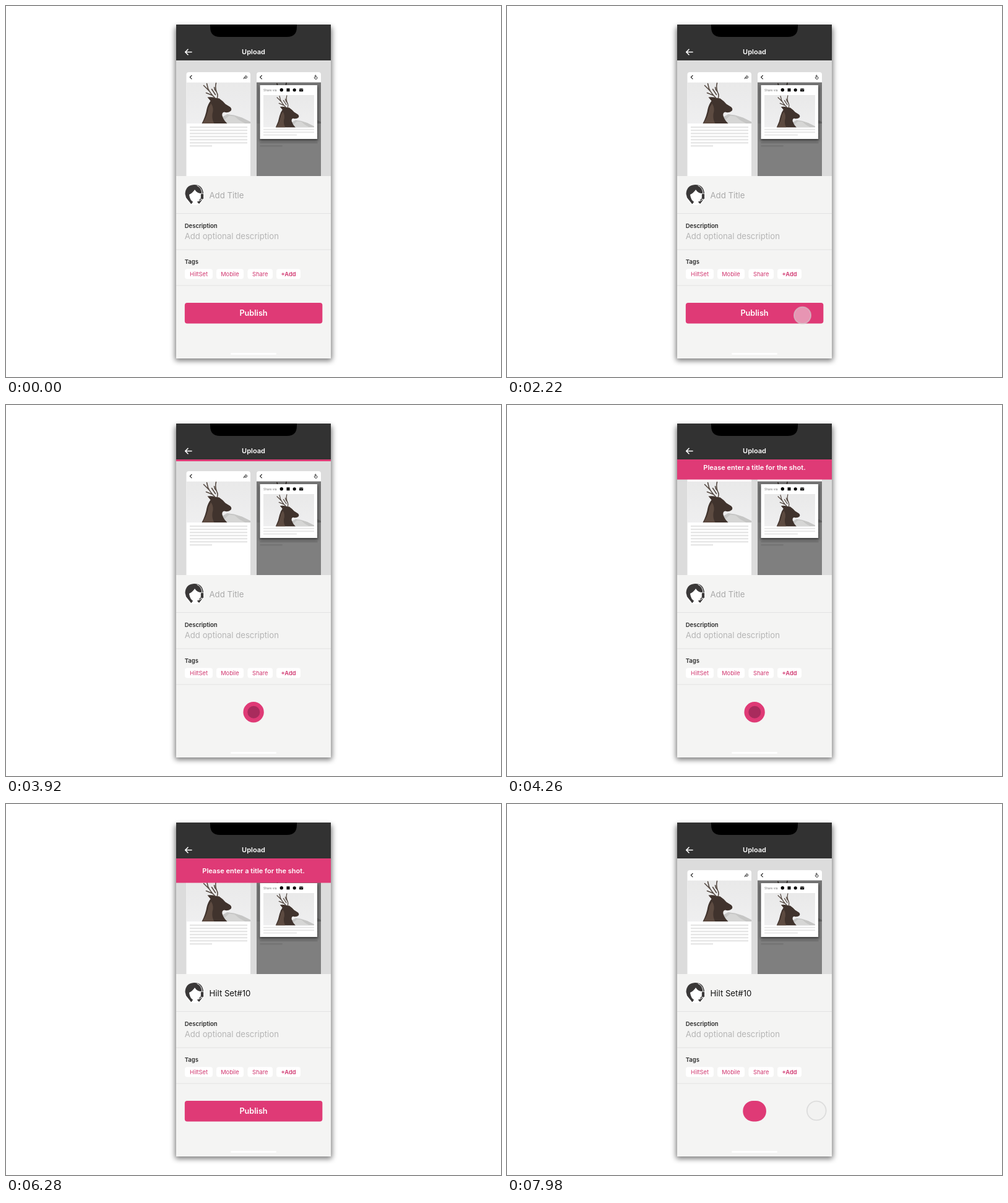
An HTML page for the animation above (8 s loop, 800 by 600 pixels).

```html
<!DOCTYPE html>
<html lang="en">
<head>
<meta charset="utf-8">
<title>Upload form</title>
<style>
  html, body { margin: 0; width: 100%; height: 100%; overflow: hidden; background: #fff; }
  svg { display: block; width: 800px; height: 600px; }
  text { font-family: Inter, "Liberation Sans", sans-serif; }
  .bold { font-weight: 600; }
  .mid { text-anchor: middle; }
  .label { font-size: 9.5px; font-weight: 600; fill: #2b2b2b; }
  .hint { font-size: 13.2px; fill: #b5b5b5; }
  .title { font-size: 13.2px; }
  .tag { font-size: 9.3px; fill: #d0366f; }
  .line { fill: none; stroke-linecap: round; stroke-linejoin: round; }
</style>
</head>
<body>
<svg viewBox="0 0 800 600">
  <defs>
    <filter id="blur" x="-20%" y="-20%" width="140%" height="140%"><feGaussianBlur stdDeviation="4.5"/></filter>
    <filter id="soft" x="-20%" y="-20%" width="140%" height="140%"><feGaussianBlur stdDeviation="2"/></filter>
    <linearGradient id="sky" x2="0" y2="1">
      <stop stop-color="#e9e9e9"/><stop offset="1" stop-color="#efeff0"/>
    </linearGradient>
    <clipPath id="screen"><rect x="275" y="30" width="250" height="540"/></clipPath>
    <clipPath id="photoBox"><rect width="104" height="66.5"/></clipPath>
    <clipPath id="typed"><rect id="typedBox" x="328" y="296" width="0" height="22"/></clipPath>
    <g id="photo" clip-path="url(#photoBox)">
      <rect width="104" height="66.5" fill="url(#sky)"/>
      <path d="M46 66.5L56 57L66 51.500L77 53L90 57L104 64V66.500Z" fill="#c6c6c5"/>
      <path d="M60 62L69 54L78 55L85 61L95 66.500H60Z" fill="#d6d6d5"/>
      <path d="M25 66.500Q31 55 33 43Q35 35 39 30L34 24Q42 23 46 25L53 26Q59 30 63 35L71 40Q74 43 72 46Q68 50 61 48Q57 49 58 54Q60 61 66 66.500Z" fill="#40332d"/>
      <path d="M26 66.500Q34 55 36 41L40 34Q45 42 42 51Q41 60 45 66.500Z" fill="#5d4b41"/>
      <path class="line" d="M46 25Q38 17 35 10L33 2M38 15L28 5M42 21L32 17M50 25Q52 18 46 12L45 8M49 16Q46 9 48 1M47 20L41 11" stroke="#554a43" stroke-width="1.600"/>
    </g>
  </defs>

  <rect x="273" y="34" width="254" height="540" rx="4" fill="#000" opacity=".5" filter="url(#blur)"/>
  <g clip-path="url(#screen)">
    <rect x="275" y="30" width="250" height="540" fill="#f4f4f3"/>
    <rect x="275" y="88" width="250" height="187" fill="#dcdcdc"/>

    <path d="M291.500 275V111a4 4 0 0 1 4-4H391a4 4 0 0 1 4 4V275Z" fill="#fff"/>
    <use href="#photo" x="291.500" y="123.500"/>
    <g id="leftLines" fill="#e6e6e6"></g>

    <path d="M405 275V111a4 4 0 0 1 4-4H505a4 4 0 0 1 4 4V275Z" fill="#fff"/>
    <use href="#photo" x="405" y="123.500"/>
    <rect x="405" y="123.500" width="104" height="151.500" fill="#000" opacity=".5"/>
    <g id="dimLines" fill="#747474"></g>
    <rect x="410" y="130" width="94" height="88" fill="#000" opacity=".45" filter="url(#soft)"/>
    <rect x="410.500" y="128" width="92.500" height="87" fill="#fff"/>
    <text x="416" y="137.700" font-size="4.900" fill="#777">Share via</text>
    <circle cx="445.300" cy="135.800" r="2.700"/>
    <rect x="453.500" y="133.300" width="5" height="5"/>
    <circle cx="466.200" cy="135.800" r="2.600"/>
    <rect x="474" y="133.500" width="6.200" height="4.800" rx=".6"/>
    <path class="line" d="M474.600 134.500L477.100 136.300L479.600 134.500" stroke="#fff" stroke-width=".6"/>
    <use href="#photo" transform="translate(416 144) scale(.788)"/>
    <g id="modalLines" fill="#e6e6e6"></g>

    <g class="line" stroke="#222" stroke-width="1.200">
      <path d="M300 112.500L297.300 115.200L300 117.900M413.300 112.500L410.600 115.200L413.300 117.900"/>
      <path d="M384.300 117.500Q384.700 114 387.500 114V112.500L390 115L387.500 117.300V115.900Q385.800 115.800 384.300 117.500Z" stroke-width=".9"/>
      <path d="M499.500 116V112.300Q500.300 111.300 501 112.300V114.500L503 115.300Q503.300 117 501.800 118.300H500L498 115.800" stroke-width=".9"/>
    </g>

    <g id="banner">
      <rect x="275" y="88" width="250" height="39.500" fill="#df3a76"/>
      <text class="bold mid" x="400" y="111.500" font-size="11" fill="#fff">Please enter a title for the shot.</text>
    </g>

    <rect x="275" y="30" width="250" height="58" fill="#323232"/>
    <path d="M330 30H470V34Q470 50 454 50H346Q330 50 330 34Z"/>
    <path class="line" d="M300 74.500H289.800M294 70.200L289.700 74.500L294 78.800" stroke="#fff" stroke-width="1.600"/>
    <text class="bold mid" x="400" y="77.500" font-size="11" fill="#fff">Upload</text>

    <path d="M275 335.500H525M275 394H525M275 452H525" stroke="#e2e2e2"/>

    <circle cx="305" cy="305.500" r="16" fill="#fff"/>
    <path d="M291 310L289.500 304Q290 290 304 289Q317 289 319 302Q320 309 316 315L312 320H299L295 315Z" fill="#3a3838"/>
    <path d="M296 305Q302 302 305 297Q309 303 315 303Q316 313 308 317.500H303Q297 314 296 305Z" fill="#fff"/>
    <path d="M299 321L302 317H309L313 321Q306 323 299 321Z" fill="#fff"/>
    <path class="line" d="M317 304Q317 294 309 290.500M317 312Q313 317 307 315" stroke="#fff" stroke-width="1"/>
    <rect x="314.500" y="303" width="5" height="10" rx="2.500" fill="#3a3838" stroke="#fff" stroke-width=".8"/>

    <text id="placeholder" class="title" x="328.500" y="310.800" fill="#a9a9a9">Add Title</text>
    <text class="title" x="328.500" y="310.800" fill="#111" clip-path="url(#typed)">Hilt Set#10</text>

    <text class="label" x="288.700" y="359.300">Description</text>
    <text class="hint" x="288.700" y="377.200">Add optional description</text>
    <text class="label" x="288.700" y="417.200">Tags</text>
    <g id="tags"></g>

    <rect x="363" y="561" width="74" height="3" rx="1.500" fill="#fff"/>

    <rect id="button" y="480" height="33.400" fill="#df3a76"/>
    <text id="publish" class="bold mid" x="400" y="501.200" font-size="12.700" fill="#fff">Publish</text>
    <circle id="badge" cx="400.300" cy="496.700" r="10" fill="#a92b5d"/>

    <circle id="touch" fill="#f0f0f0" fill-opacity=".5" stroke="#cfcfcf" stroke-opacity=".6" stroke-width="1.800"/>
  </g>
</svg>
<script>
const LOOP = 8000;
const byId = id => document.getElementById(id);
const set = (id, attrs) => {
  for (const key in attrs) byId(id).setAttribute(key, attrs[key]);
};

// Placeholder paragraphs: full-width lines and a short last one
function paragraph(id, x, y, width, lastWidth, count, step, height) {
  let svg = '';
  for (let i = 0; i < count; i++) {
    const w = i === count - 1 ? lastWidth : width;
    svg += `<rect x="${x}" y="${y + i * step}" width="${w}" height="${height}"/>`;
  }
  byId(id).innerHTML = svg;
}
paragraph('leftLines', 297, 194.8, 93, 36, 7, 5.05, 2.4);
paragraph('dimLines', 410.5, 194.8, 93, 36, 7, 5.05, 2.4);
paragraph('modalLines', 416, 198.8, 82, 54, 3, 4.4, 1.9);

byId('tags').innerHTML = [
  ['HiltSet', 289, 45], ['Mobile', 340, 44], ['Share', 390.5, 40.500], ['+Add', 437, 39]
].map(([name, x, w]) => `<rect x="${x}" y="425.300" width="${w}" height="16.200" rx="4" fill="#fff"/>
  <text class="tag mid${name[0] === '+' ? ' bold' : ''}" x="${x + w / 2}" y="436.800">${name}</text>`).join('');

const mix = (a, b, k) => a + (b - a) * k;
const progress = (t, from, to) => Math.min(1, Math.max(0, (t - from) / (to - from)));
const inOut = x => x < .5 ? 2 * x * x : 1 - 2 * (1 - x) ** 2;
const out = x => 1 - (1 - x) ** 3;

// Cubic Bezier (.25, .1, .25, 1)
function ease(x) {
  let lo = 0, hi = 1;
  for (let i = 0; i < 18; i++) {
    const s = (lo + hi) / 2;
    if (.75 * s * (1 - s) + s ** 3 < x) lo = s; else hi = s;
  }
  return .3 * lo * (1 - lo) ** 2 + 3 * lo * lo * (1 - lo) + lo ** 3;
}

const taps = [
  { enter: 880, arrive: 1610, press: 2220, release: 2360, from: [542, 511], at: [477.500, 500.300] },
  { enter: 6960, arrive: 7370, press: 7520, release: 7660, from: [542, 497], at: [482, 496] }
];

function drawTouch(t) {
  const tap = taps[t < 5000 ? 0 : 1];
  const arriving = inOut(progress(t, tap.enter, tap.arrive));
  const leaving = inOut(progress(t, tap.release, tap.release + 830));
  const pressed = t >= tap.press && t < tap.release;
  set('touch', {
    cx: mix(mix(tap.from[0], tap.at[0], arriving), 543, leaving),
    cy: mix(mix(tap.from[1], tap.at[1], arriving), 496, leaving),
    r: pressed ? 13.6 : 15.4
  });
}

function drawButton(t) {
  const shrink = ease(progress(t, 2350, 2760)) - ease(progress(t, 5910, 6280)) + ease(progress(t, 7650, 8060));
  const width = mix(222.500, 33.400, shrink);
  set('button', { x: 400.100 - width / 2, width, rx: mix(4, 16.700, shrink) });
  set('publish', { opacity: 1 - progress(t, 2360, 2480) + progress(t, 6080, 6260) - progress(t, 7660, 7780) });
  set('badge', { opacity: progress(t, 2700, 2920) - progress(t, 5900, 6020) });
}

function draw(t) {
  const shown = out(progress(t, 3900, 4720)) - inOut(progress(t, 7650, 7960));
  set('banner', { transform: `translate(0 ${-39.500 * (1 - shown)})` });
  set('placeholder', { opacity: 1 - progress(t, 4750, 4860) });
  set('typedBox', { width: 76 * progress(t, 5180, 5790) });
  drawButton(t);
  drawTouch(t);
}

const start = performance.now();
function frame() {
  draw((performance.now() - start) % LOOP);
  requestAnimationFrame(frame);
}
frame();
</script>
</body>
</html>
```
